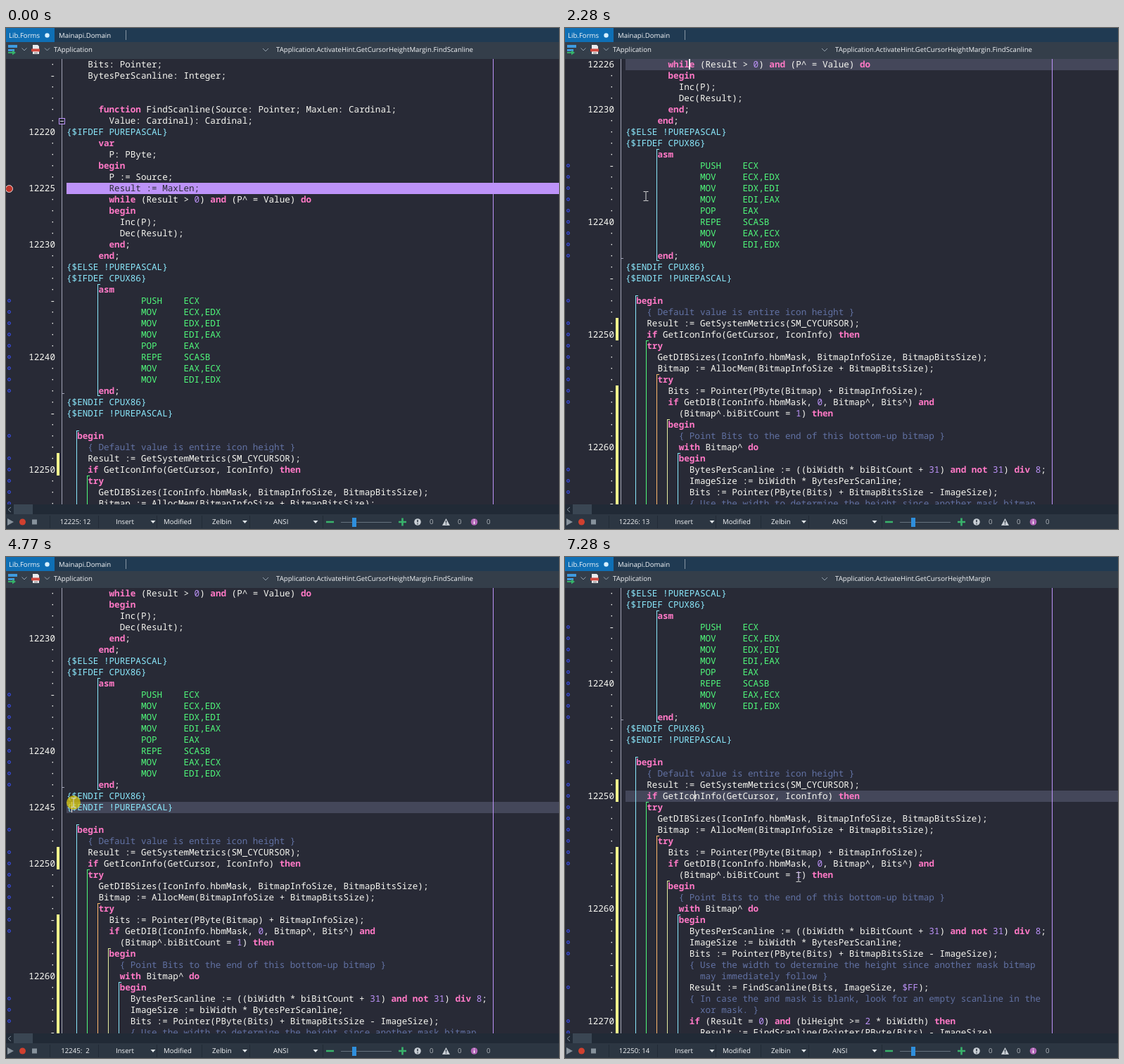
An HTML page for the animation above (8 s loop, 786x712 px).

```html
<!DOCTYPE html>
<html lang="en">
<head>
<meta charset="utf-8">
<title>Code editor</title>
<style>
  html, body { margin: 0; width: 100%; height: 100%; overflow: hidden; background: #282a36; }
  #stage { position: relative; width: 786px; height: 712px; overflow: hidden; text-rendering: geometricPrecision; }
  #stage > svg { position: absolute; left: 0; top: 0; }
  #chrome text { font: 9.65px "Open Sans", "Noto Sans", sans-serif; fill: #f4f6f8; white-space: pre; }
  #editor {
    position: absolute; left: 0; top: 44px; width: 786px; height: 633px; overflow: hidden;
    background: #282a36; color: #f8f8f2;
    font: 12.62px/16px "Noto Sans Mono", "DejaVu Sans Mono", monospace;
  }
  #editor div, #editor i, #editor code { position: absolute; }
  .row { left: 0; width: 786px; height: 16px; white-space: pre; }
  .num { right: 716px; }
  .row code { left: 86px; width: 700px; height: 16px; font: inherit; }
  .current code, .selected code { background: #44475a; }
  .stop code { background: #bd93f9; color: #282a36; }
  .ring { left: 1.5px; top: 5px; width: 3px; height: 3px; border: 1px solid #3c50e8; border-radius: 50%; background: #28306e; }
  .bullet { left: -1px; top: 3px; width: 9px; height: 9px; border: 1px solid #e8d8d8; border-radius: 50%; background: #c0352b; }
  .changed { left: 72px; top: 0; width: 4px; height: 16px; background: #f1fa8c; }
  .bracket { width: 4px; border: 0 solid; border-width: 1px 0 0 1px; box-sizing: border-box; }
  .rule { top: 0; width: 1px; height: 633px; }
  .fold { left: 75px; width: 7px; height: 7px; border: 1px solid #bd93f9; background: #282a36; }
  .fold::after { content: ""; position: absolute; left: 1px; top: 3px; width: 5px; height: 1px; background: #d8d8e8; }
  .foldEnd { left: 79px; width: 4px; height: 1px; background: #a0a2b4; }
  #caret { width: 1.4px; height: 15px; background: #f8f8f2; }
  .key { color: #ff79c6; font-weight: bold; }
  .note { color: #6272a4; }
  .dir { color: #8be9fd; }
  .lit { color: #bd93f9; }
  .op { color: #50fa7b; }
  .selected span { color: #f8f8f2; }
</style>
</head>
<body>
<div id="stage">
  <div id="editor">
    <div class="rule" style="left:79px;background:#a0a2b4"></div>
    <div id="doc"></div>
    <div class="rule" style="left:692px;background:#bd93f9"></div>
  </div>

  <svg id="chrome" width="786" height="712">
    <rect width="786" height="20" fill="#203a52"/>
    <rect width="69" height="20" fill="#0f6fb5"/>
    <rect y="20" width="786" height="24" fill="#343e4a"/>
    <text x="4" y="13.5">Lib.Forms</text>
    <circle cx="58.5" cy="10.5" r="3.2" fill="#d8f1ff"/>
    <text x="75" y="13.5">Mainapi.Domain</text>
    <path d="M170.5 3V17" stroke="#8795a3"/>
    <path d="M3 24h13v4H3zM3 30h9v3H3z" fill="#3f9be0"/>
    <path d="M3 34h6v-2.500l5 3.500-5 3.500V36H3z" fill="#35b36a"/>
    <path d="M38 24h7l2 2v11H38z" fill="#e9ebee"/>
    <path d="M36 29.500h12v4H36z" fill="#d0483e"/>
    <path d="M40 35.500h5" stroke="#777"/>
    <path d="M22.500 28.500l3.500 3.500 3.500-3.500M55 28.500l3.500 3.500 3.500-3.500M365 29l4 4 4-4" fill="none" stroke="#93a0ad"/>
    <text x="68" y="33.700">TApplication</text>
    <text x="384" y="33.700" id="crumb"></text>

    <rect y="677" width="786" height="14" fill="#212a36"/>
    <rect x="11" y="677" width="27" height="14" fill="#3a4653"/>
    <path d="M7 681l-4 3.500 4 3.500" fill="none" stroke="#8996a3"/>
    <rect y="691" width="786" height="21" fill="#2c3642"/>
    <path d="M62.500 693v18M131.500 693v18M214.500 693v18M278.500 693v18M346.500 693v18M450.500 693v18" stroke="#222b36"/>
    <path d="M2 697l9 5-9 5z" fill="#87929c"/>
    <circle cx="23.500" cy="702" r="4.500" fill="#d0402f"/>
    <rect x="37" y="698.500" width="7" height="7" fill="#87929c"/>
    <text x="98.500" y="705.300" text-anchor="middle" id="pos"></text>
    <text x="156" y="705.300">Insert</text>
    <text x="224" y="705.300">Modified</text>
    <text x="293" y="705.300">Zelbin</text>
    <text x="380" y="705.300">ANSI</text>
    <path d="M205.500 700h7l-3.500 4zM336 700h7l-3.500 4zM436.500 700h7l-3.500 4z" fill="#dfe4e8"/>
    <path d="M455 702h11M558 702h11M563.500 696.500v11" stroke="#39b36b" stroke-width="2.600"/>
    <path d="M476 702.500h72" stroke="#66727e"/>
    <rect x="492" y="696" width="6" height="13" fill="#2f8fdc"/>
    <circle cx="585" cy="702" r="4.800" fill="#c9cfd5"/>
    <path d="M585 699v3.500M585 704v1.300" stroke="#2c3642" stroke-width="1.500"/>
    <path d="M625.500 697l5.500 10h-11z" fill="#c9cfd5"/>
    <path d="M625.500 700v3.500M625.500 704.500v1.300" stroke="#2c3642" stroke-width="1.300"/>
    <circle cx="665.500" cy="702" r="4.800" fill="#b265b8"/>
    <path d="M665.500 701v4M665.500 698.500v1.300" stroke="#fff" stroke-width="1.400"/>
    <g opacity=".65"><text x="602" y="705.300">0</text><text x="642" y="705.300">0</text><text x="683" y="705.300">0</text></g>
  </svg>

  <svg id="overlay" width="786" height="712">
    <g id="mark">
      <rect y="283" width="16" height="16" fill="#555a66"/>
      <path d="M2 290l3-3 2 2-3 3zM7 293l3-3 2 2-3 3z" fill="#e8c53a"/>
    </g>
    <g id="mouse">
      <circle id="press" r="10" fill="#dccb10" opacity=".75"/>
      <path id="beam" d="M-3.500-6.500h3l.5.500.5-.5h3M0-6v12M-3.500 6.500h3l.5-.5.5.5h3" fill="none" stroke="#d6d6d6"/>
      <path id="arrow" d="M0 0V12.500l3-2.700 2 4.500 2-1-2-4.300h4z" fill="#fff" stroke="#222" stroke-width=".7"/>
    </g>
  </svg>
</div>

<script>
const FIRST = 12214, ROW = 16, COL = 7.57, LEFT = 86, LOOP = 8000;

const source = `    Bits: Pointer;
    BytesPerScanline: Integer;


      function FindScanline(Source: Pointer; MaxLen: Cardinal;
        Value: Cardinal): Cardinal;
{$IFDEF PUREPASCAL}
      var
        P: PByte;
      begin
        P := Source;
        Result := MaxLen;
        while (Result > 0) and (P^ = Value) do
        begin
          Inc(P);
          Dec(Result);
        end;
      end;
{$ELSE !PUREPASCAL}
{$IFDEF CPUX86}
      asm
              PUSH    ECX
              MOV     ECX,EDX
              MOV     EDX,EDI
              MOV     EDI,EAX
              POP     EAX
              REPE    SCASB
              MOV     EAX,ECX
              MOV     EDI,EDX
      end;
{$ENDIF CPUX86}
{$ENDIF !PUREPASCAL}

  begin
    { Default value is entire icon height }
    Result := GetSystemMetrics(SM_CYCURSOR);
    if GetIconInfo(GetCursor, IconInfo) then
    try
      GetDIBSizes(IconInfo.hbmMask, BitmapInfoSize, BitmapBitsSize);
      Bitmap := AllocMem(BitmapInfoSize + BitmapBitsSize);
      try
        Bits := Pointer(PByte(Bitmap) + BitmapInfoSize);
        if GetDIB(IconInfo.hbmMask, 0, Bitmap^, Bits^) and
          (Bitmap^.biBitCount = 1) then
        begin
          { Point Bits to the end of this bottom-up bitmap }
          with Bitmap^ do
          begin
            BytesPerScanline := ((biWidth * biBitCount + 31) and not 31) div 8;
            ImageSize := biWidth * BytesPerScanline;
            Bits := Pointer(PByte(Bits) + BitmapBitsSize - ImageSize);
            { Use the width to determine the height since another mask bitmap
              may immediately follow }
            Result := FindScanline(Bits, ImageSize, $FF);
            { In case the and mask is blank, look for an empty scanline in the
              xor mask. }
            if (Result = 0) and (biHeight >= 2 * biWidth) then
              Result := FindScanline(Pointer(PByte(Bits) - ImageSize),
              ImageSize, $00);
            Result := Result div BytesPerScanline;
          end;
          Dec(Result, IconInfo.yHotspot);
        end;
      finally`;

const $ = id => document.getElementById(id);
const doc = $("doc");
const between = (n, a, b) => n >= a && n <= b;
const top16 = line => (line - FIRST) * ROW;

function add(parent, tag, cls, style = "") {
  const el = document.createElement(tag);
  el.className = cls;
  el.style.cssText = style;
  return parent.appendChild(el);
}

// Syntax colouring; a comment may run on to the next line
const TOKEN = /(\{\$[^}]*\})|(\{[^}]*\}?)|\b(function|var|begin|end|while|and|do|asm|if|then|try|with|not|div|finally)\b|(\$[0-9A-F]+|\b\d+\b)/g;
const span = (cls, text) => `<span class="${cls}">${text}</span>`;
let open = false;
function paint(text, line) {
  if (between(line, 12235, 12242)) return span("op", text);
  if (open) {
    open = !text.includes("}");
    return span("note", text);
  }
  return text.replace(/[<>]/g, c => c === "<" ? "\u2039" : "\u0001")
    .replace(TOKEN, (all, dir, note, key) => {
      if (note) open = !note.endsWith("}");
      return span(dir ? "dir" : note ? "note" : key ? "key" : "lit", all);
    }).replace(/\u0001/g, "&gt;");
}

const hasRing = n => between(n, 12235, 12243) || between(n, 12249, 12256) ||
  between(n, 12262, 12264) || [12247, 12267, 12270, 12271, 12273].includes(n);

const rows = source.split("\n").map((text, i) => {
  const line = FIRST + i;
  const el = add(doc, "div", "row", `top:${i * ROW}px`);
  const num = add(el, "div", "num");
  add(el, "code", "").innerHTML = paint(text, line);
  if (hasRing(line)) add(el, "i", "ring");
  if (between(line, 12249, 12250) || line >= 12255) add(el, "i", "changed");
  if (line === 12225) add(el, "i", "bullet");
  return { el, num, line };
});

// Block guides: first line, last line, column, colour
[[12234, 12243, 6, "#8be9fd"], [12247, 12290, 2, "#8be9fd"], [12251, 12290, 4, "#50fa7b"],
 [12254, 12290, 6, "#ffb86c"], [12258, 12276, 8, "#e4eda0"], [12261, 12274, 10, "#8be9fd"]]
  .forEach(([from, to, col, color]) => add(doc, "i", "bracket",
    `left:${Math.round(LEFT + col * COL - 1.4)}px;top:${top16(from)}px;` +
    `height:${top16(to) - top16(from) + 15}px;border-color:${color};border-bottom-width:1px`));
add(doc, "i", "fold", `top:${top16(12219) + 4}px`);
add(doc, "i", "foldEnd", `top:${top16(12243) + 11}px`);
const caret = add(doc, "i", "");
caret.id = "caret";

// Timelines, all in milliseconds
const scroll = [[0, 12214], [1260, 12217], [1330, 12220], [1480, 12223], [1620, 12226],
  [5380, 12229], [5450, 12232], [5600, 12235], [5820, 12238], [5990, 12235], [6130, 12232]];
const carets = [[0, 12225, 12], [620, 12226, 13], [2350, 12237, 3], [2890, 12239, 1],
  [3560, 12235, 1], [4680, 12245, 2], [6790, 12250, 14]];
const presses = [[620, 800], [2350, 2600], [2890, 3080], [3560, 4330], [4680, 5040], [6790, 6980]];
const path = [[190, 270, 400], [600, 180, 251], [980, 180, 251], [1070, 177, 285], [1990, 177, 285],
  [2340, 103, 230], [2600, 103, 230], [2750, 92, 261], [2890, 88, 264], [3290, 88, 264],
  [3370, 74, 198], [3560, 74, 198], [3880, 67, 295], [3940, 67, 296], [3990, 67, 299],
  [4530, 67, 299], [4700, 96, 349], [5040, 96, 349], [5340, 163, 359], [5850, 163, 359],
  [6300, 189, 328], [6700, 189, 328], [6780, 187, 338], [6980, 187, 338], [7280, 332, 455]];

const latest = (list, t) => list.filter(k => k[0] <= t).pop();

function mouseAt(t) {
  const next = path.findIndex(k => k[0] > t);
  if (next < 1) return path[next ? path.length - 1 : 0].slice(1);
  const a = path[next - 1], b = path[next], f = (t - a[0]) / (b[0] - a[0]);
  return [1, 2].map(i => a[i] + (b[i] - a[i]) * f);
}

function show(el, on) { el.style.display = on ? "" : "none"; }

let shown = "";
function render(t) {
  const top = latest(scroll, t)[1];
  const [x, y] = mouseAt(t);
  let [, line, col] = latest(carets, t);
  const selecting = between(t, 3560, 4679);
  if (selecting) line = Math.min(12241, top + Math.floor((y - 44) / ROW));

  const state = [top, line, col, selecting].join();
  if (state !== shown) {
    shown = state;
    doc.style.top = -top16(top) + "px";
    for (const r of rows) {
      const current = r.line === line;
      r.num.textContent = current || r.line % 10 === 0 ? r.line : r.line % 5 ? "·" : "-";
      r.el.className = "row" + (r.line === 12225 ? " stop" : current ? " current" : "") +
        (selecting && between(r.line, 12235, line - 1) ? " selected" : "");
    }
    caret.style.left = LEFT + (col - 1) * COL - 0.7 + "px";
    caret.style.top = top16(line) + "px";
    show(caret, line !== 12225);
    $("pos").textContent = line + ": " + String(col).padStart(2);
    $("crumb").textContent = "TApplication.ActivateHint.GetCursorHeightMargin" +
      (line === 12250 ? "" : ".FindScanline");
    show($("mark"), selecting);
    $("mark").setAttribute("transform", `translate(0 ${(line - 12241) * ROW})`);
  }

  show($("mouse"), t >= 190);
  $("mouse").setAttribute("transform", `translate(${Math.round(x)} ${Math.round(y)})`);
  show($("press"), presses.some(([a, b]) => t >= a && t < b));
  show($("arrow"), x < 82);
  show($("beam"), x >= 82);
}

const start = performance.now();
function tick() {
  render((performance.now() - start) % LOOP);
  requestAnimationFrame(tick);
}
tick();
</script>
</body>
</html>
```
